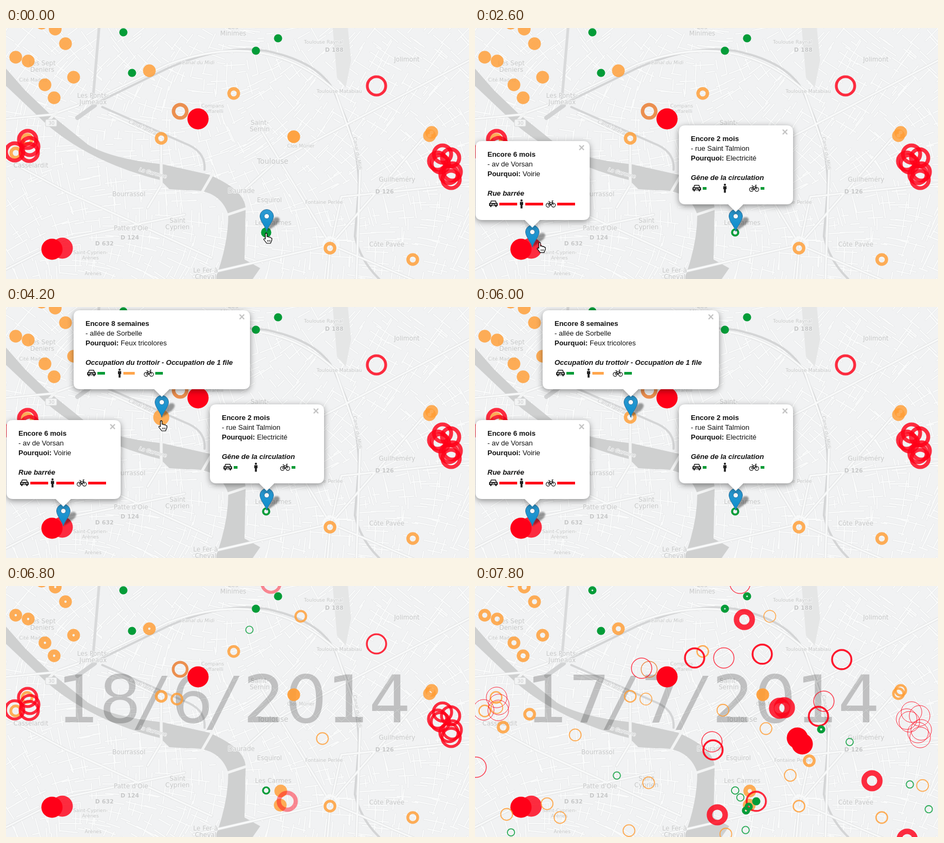
An HTML page that plays this animation: 856 by 464 pixels, repeating every 8000 ms.

```html
<!DOCTYPE html>
<html lang="fr">
<head>
<meta charset="utf-8">
<title>Carte des chantiers</title>
<style>
html, body { margin: 0; width: 100%; height: 100%; overflow: hidden; background: #f1f2f3; }
svg { display: block; width: 856px; height: 464px; }
.label { font-family: "DejaVu Sans", sans-serif; fill: #c6c7c8; text-anchor: middle;
  stroke: #f4f5f5; stroke-width: 2; paint-order: stroke; stroke-linejoin: round; }
.date { font: 122px "DejaVu Sans", sans-serif; fill: #000; opacity: .2; }
.slash { font-style: italic; }
.popup { font: 13px "Liberation Sans", Arial, sans-serif; fill: #111; }
.bold { font-weight: bold; }
.em { font-weight: bold; font-style: italic; }
.box { fill: #fff; filter: drop-shadow(0 3px 6px rgba(0,0,0,.42)); }
.close { font-weight: bold; font-size: 20px; fill: #c3c3c3; text-anchor: middle; }
.line { fill: none; stroke-linejoin: round; stroke-linecap: round; }
</style>
</head>
<body>
<svg viewBox="0 0 856 464">
  <defs>
    <filter id="soft" x="-50%" y="-50%" width="200%" height="200%"><feGaussianBlur stdDeviation="1.6"/></filter>
    <linearGradient id="blue" x2="0" y2="1"><stop stop-color="#2e9bd3"/><stop offset="1" stop-color="#0a8ccb"/></linearGradient>
    <g id="pin">
      <path d="M0 0L7-17Q13-28 21-26Q28-22 18-12Z" fill="#000" opacity=".38" filter="url(#soft)"/>
      <path d="M0 0C-2-9-12-18-12.5-28A12.5 12.5 0 0 1 12.5-28C12-18 2-9 0 0Z" fill="url(#blue)" stroke="#2b6f9c"/>
      <circle cy="-28" r="4.6" fill="#fff" stroke="#2b76a6"/>
    </g>
    <g id="car">
      <path d="M-8-1L-6-2-4.500-6H4.500L6-2 8-1V4H6V6H3.500V4H-3.500V6H-6V4H-8Z" fill="#222"/>
      <path d="M-3.500-4.500H3.500L4.500-1.500H-4.500Z" fill="#fff"/>
      <path d="M-6 1H-3M3 1H6M-2 2H2" stroke="#fff" stroke-width="1.300"/>
    </g>
    <g id="person" fill="#222">
      <circle cy="-6.200" r="2"/>
      <path d="M-3-3.500H3V2H1.800V8.500H-1.800V2H-3Z"/>
    </g>
    <g id="bike" fill="none" stroke="#222" stroke-width="1.200">
      <circle cx="-5" cy="2.500" r="3.600"/><circle cx="5" cy="2.500" r="3.600"/>
      <path d="M-5 2.500L-2-2.500H3.500L0 2.500H-5M0 2.500L-2.500-4.500H-4.500M5 2.500L2.500-5.500H5"/>
    </g>
    <g id="point" fill="#fff" stroke="#000" stroke-width="1.200" stroke-linejoin="round">
      <path d="M-1.500 0Q0-1.500 1.500 0V6L4 5.500 5 7 7.500 6.500 8.500 8 10.500 8.500V12L8 18H1L-4.500 11Q-4.500 8.500-1.500 10Z"/>
      <path d="M2.500 12V15M4.800 12V15M7 12V15" stroke-width=".9"/>
    </g>
    <g id="palm" fill="#fff" stroke="#000" stroke-width="1.200" stroke-linejoin="round">
      <path d="M-4.500 16L-8 9.500Q-7 7.500-4.500 9.500L-6 3Q-4 1-3 3L-2 7-2 1Q0-1 1 1V7L2.500 1.500Q4.500 1 4.500 3L4 8 6 4.500Q8 4.500 7.500 7L5 13V16Z"/>
    </g>
  </defs>
  <g id="map"></g>
  <g id="date"></g>
  <g id="dots"></g>
  <g id="pins"></g>
  <g id="popups"></g>
  <use id="cursor"/>
</svg>
<script>
const STEP = 200, STEPS = 40, REPLAY = 32, MID = 34, END = 39;
const RED = '#ff0018', ORANGE = '#ff9c33', RUST = '#e9792b', GREEN = '#049c38';
const RADIUS = { [RED]: 19.6, [ORANGE]: 11.8, [RUST]: 15.5, [GREEN]: 7.6 };
const $ = id => document.getElementById(id);
const lerp = (a, b, u) => a + (b - a) * u;
const random = seed => () => (seed = (seed * 16807) % 2147483647) / 2147483647;
const pairs = text => text.trim().split(/\s+/).map(p => p.split(',').map(Number));

// ---- base map
const line = (d, color, width) =>
  `<path class="line" d="${d}" stroke="${color}" stroke-width="${width}"/>`;
const area = (d, color) => `<path d="${d}" fill="${color}"/>`;

// short streets that follow a slowly turning grid
function streets() {
  const rnd = random(31);
  let d = '';
  for (let y = -5; y < 475; y += 18) {
    for (let x = -5; x < 865; x += 20) {
      const turn = .5 * Math.sin(x / 140) + .6 * Math.cos(y / 110 + x / 300);
      const a = turn + (rnd() < .5 ? Math.PI / 2 : 0), len = 10 + rnd() * 36;
      const from = [x + rnd() * 20, y + rnd() * 18];
      const by = [Math.cos(a) * len, Math.sin(a) * len];
      d += `M${from.map(v => v.toFixed(1))}l${by.map(v => v.toFixed(1))}`;
    }
  }
  return d;
}

// avenues that leave a centre at even angles
function avenues(x, y, inner, outer, count, tilt) {
  let d = '';
  for (let i = 0; i < count; i++) {
    const a = tilt + i * 2 * Math.PI / count, c = Math.cos(a), s = Math.sin(a);
    d += `M${x + c * inner} ${y + s * inner}L${x + c * outer} ${y + s * outer}`;
  }
  return d;
}

const RIVER = 'M0 75L36 116 80 158 152 216Q195 242 290 252L375 271Q443 300 443 335L441 428 470 444 456 464H387Q411 400 411 345 395 297 335 300L302 298 285 281Q160 250 76 179L0 107Z';
const CANAL = 'M178 146L330 213Q370 228 367 262M160 142L300 74Q400 30 480 42 590 65 612 130 655 220 652 300L645 385Q655 430 690 464';
const ROADS = 'M0 168L85 160 160 134 300 67Q480 0 608 115L655 250 648 464M0 243L110 302 380 425M190 160L287 205V290L262 332M0 446L110 390 330 345M600 406L620 312 856 288M440 300L500 246 856 60' +
  avenues(600, 401, 14, 260, 5, .4);
const BRIDGES = 'M383 268L362 304M443 334L410 345M287 250V290M72 178L94 155';

// text (lines split by |), middle, baseline of the first line
const towns = [
  ['Les|Minimes', 420, 2], ['Les Sept|Deniers', 67, 69], ['Les Ponts-|Jumeaux', 161, 129],
  ['Casselardit', 46, 258], ['Bourrassol', 227, 311], ["Patte d'Oie", 231, 374], ['Saint|Cyprien', 317, 360],
  ['Le Fer à|Cheval', 369, 452], ['Daurade', 435, 305], ['Esquirol', 487, 322], ['Saint-|Sernin', 469, 179],
  ['Les Carmes', 494, 364], ['Jolimont', 741, 62], ['Guilheméry', 723, 284], ['Côte Pavée', 704, 404]
];
const stops = [
  ['Cité Madrid', 50, 99], ['Saint-Cyprien-|Arènes', 156, 418], ['Arènes', 161, 457], ['Clos Mûrier', 545, 221],
  ['Fontaine Perlée', 588, 325], ['Compans|Caffarelli', 382, 147], ['Toulouse Raynal', 587, 29],
  ['Toulouse Matabiau', 616, 120], ['30', 84, 179]
];
const routes = [['D 188', 607, 44], ['D 126', 700, 306], ['D 124', 229, 391], ['D 632', 182, 402]];
const waters = [['La Garonne', 271, 271, 15], ['Canal latéral', 252, 187, 25],
  ['Canal du Midi', 355, 67, 0], ['Canal du Midi', 647, 232, 80]];

const label = (size, extra = '') => ([text, x, y, turn = 0]) => text.split('|').map((part, i) =>
  `<text class="label" font-size="${size}" ${extra} transform="translate(${x} ${y + i * (size + .6)}) rotate(${turn})">${part}</text>`).join('');

function drawMap() {
  const small = streets();
  $('map').innerHTML = [
    area('M0 0H856V464H0Z', '#f1f2f3'),
    line(small, '#e7e8e9', 3.6), line(small, '#fafbfb', 2.2),
    area('M604 0H632L638 60 628 110 612 92Z', '#e5e6e6'),
    area(RIVER, '#cfd0d0'), line(CANAL, '#d4d5d6', 4), line('M132 166L164 143', '#d2d3d4', 8),
    line('M172 0L160 140', '#d9dadb', 5),
    line(ROADS, '#dedfe0', 5.2), line(ROADS, '#f8f9f9', 3.6), line(BRIDGES, '#f3f4f4', 5),
    '<circle cx="600" cy="401" r="13" fill="none" stroke="#f8f9f9" stroke-width="4"/>',
    '<rect x="73" y="169" width="21" height="13" rx="2" fill="#f3f4f4" stroke="#d5d6d7"/>',
    ...towns.map(label(11.6)), label(13.4)(['Toulouse', 493, 251]), ...stops.map(label(9)),
    ...waters.map(label(9, 'font-style="italic"')), ...routes.map(label(10.5, 'font-weight="bold"'))
  ].join('');
}

// ---- works: each ring has a final stroke and gets thinner as its days run out
const works = [];
function add(color, end, points, start = () => 0, alpha = .82) {
  points.forEach(([x, y], i) => works.push({ x, y, color, end, alpha, start: start(i) }));
}
const early = () => MID - 1, fading = () => MID;
const late = i => MID + 1 + i % 3;
function scatter(count, seed) {
  const rnd = random(seed);
  return Array.from({ length: count }, () => [rnd() * 800 + 40, rnd() * 270 + 190]);
}

add(ORANGE, 7, pairs('66,-9 91,2 110,29 18,54 41,61 125,91 72,105 89,129 265,79'));
add(ORANGE, 2.5, pairs('421,121 287,204 599,407 752,428 18,231 39,206'));
add(ORANGE, 4.5, pairs('787,193 783,199'));
add(ORANGE, 12, pairs('532,201'), undefined, .92);
add(RUST, 1.5, pairs('322,154'));
add(RED, -1, pairs('685,107'));
add(RED, 20, pairs('104,407'));
add(RED, 20, pairs('355,168 85,409'), undefined, 1);
add(RED, 1, pairs('40,206 16,229 44,219 43,230 807,233 822,240 798,246 803,251 825,266 819,271 823,280'));
add(GREEN, 6, pairs('217,8 503,19 462,42'), undefined, 1);
add(GREEN, 8, pairs('233,83'), undefined, 1);
add(GREEN, 1.5, pairs('481,378'), undefined, 1);

add(ORANGE, 1.5, pairs('545,56 316,209'), early);
add(ORANGE, -.7, pairs('585,282'), early);
add(ORANGE, 8, pairs('508,379 507,405'), early);
add(GREEN, 0, pairs('450,81'), early);
add(RED, 1.3, pairs('490,-5'), fading);
add(RED, 3.5, pairs('520,398'), fading);

add(RED, 1.5, pairs('460,133 308,152 645,213 438,288 2,335'), late, .75);
add(RED, 3.5, pairs('531,126 406,133 678,136 635,241 440,303'), late, .9);
add(RED, 10, pairs('498,62 563,226 572,225 448,423 734,360 799,468'), late);
add(RED, 20, pairs('596,281 605,292'), late, 1);
add(ORANGE, 5.5, pairs('101,237 52,261 618,323'), late);
add(ORANGE, 1.8, scatter(12, 77), late);
add(GREEN, 5.5, pairs('640,265 501,415 506,408'), late, 1);
add(GREEN, 8, pairs('520,398'), late, 1);
add(GREEN, 1.8, scatter(7, 4242), late);

const hovers = [
  { x: 481, y: 378, from: 0, to: 2 },
  { x: 104, y: 407, from: 7, to: 11 },
  { x: 287, y: 204, from: 18, to: 22 }
];
const hoverAt = k => hovers.find(h => k >= h.from && k <= h.to);

function ring({ x, y, color, end, alpha, start }, k, hot) {
  if (k < start) return '';
  const over = hot && hot.x === x && hot.y === y;
  const r = RADIUS[color] * (over ? 1.25 : 1);
  const w = end + r * .045 * (END - Math.max(k, REPLAY));
  if (w <= 0) return '';
  const at = `<circle cx="${x}" cy="${y}" opacity="${k === start && start ? alpha * .55 : alpha}"`;
  return over || w > r * .88 ? `${at} r="${r}" fill="${color}"/>`
    : `${at} r="${r - w / 2}" fill="none" stroke="${color}" stroke-width="${w}"/>`;
}

function drawDots(k) {
  const hot = hoverAt(k);
  $('dots').innerHTML = works.map(work => ring(work, k, hot)).join('');
}

function drawDate(k) {
  if (k < REPLAY) { $('date').innerHTML = ''; return; }
  const day = new Date(2014, 5, 6 + Math.round((k - REPLAY) * 5.86));
  const d = String(day.getDate()), digit = 77.6, bar = 55.4;
  let x = 94.6 + (2 - d.length) * digit / 2;
  const parts = [d, '/', String(day.getMonth() + 1), '/', '2014'].map(s => {
    const slash = s === '/';
    const span = slash ? `<tspan class="slash" x="${x - 3}" y="255">/</tspan>` : `<tspan x="${x}" y="251.5">${s}</tspan>`;
    x += slash ? bar : s.length * digit;
    return span;
  });
  $('date').innerHTML = `<text class="date">${parts.join('')}</text>`;
}

// ---- popups; bars are the widths beside car, person and bike
const popups = [
  { x: 377, y: 180, w: 211, tip: 482, foot: 376, pin: 0, open: 1, time: '2 mois', road: 'rue Saint Talmion', why: 'Electricité',
    what: 'Gêne de la circulation', bars: [[7, GREEN], [0, GREEN], [7, GREEN]] },
  { x: 1, y: 209, w: 211, tip: 106, foot: 405, pin: 9, open: 9, time: '6 mois', road: 'av de Vorsan', why: 'Voirie',
    what: 'Rue barrée', bars: [[33, RED], [33, RED], [33, RED]] },
  { x: 125, y: 6, w: 326, tip: 288, foot: 204, pin: 19, open: 19, time: '8 semaines', road: 'allée de Sorbelle', why: 'Feux tricolores',
    what: 'Occupation du trottoir - Occupation de 1 file', bars: [[14, GREEN], [21, '#ffa64d'], [14, GREEN]] }
];
const icons = [['car', 33, 44], ['person', 85, 92], ['bike', 139, 151]];

function popupMarkup(p) {
  const t = p.tip - p.x;
  return `<g class="popup" transform="translate(${p.x} ${p.y})">
    <path class="box" d="M12 0H${p.w - 12}q12 0 12 12V134q0 12-12 12H${t + 14}L${t} 160 ${t - 14} 146H12q-12 0-12-12V12Q0 0 12 0Z"/>
    <text class="close" x="${p.w - 15}" y="19">×</text>
    <text class="bold" x="22" y="29">Encore ${p.time}</text>
    <text x="22" y="47">- ${p.road}</text>
    <text x="22" y="65"><tspan class="bold">Pourquoi:</tspan> ${p.why}</text>
    <text class="em" x="22" y="101">${p.what}</text>` +
    icons.map(([name, x, bx], i) => `<use href="#${name}" x="${x}" y="116"/>
      <rect x="${bx}" y="114" width="${p.bars[i][0]}" height="5" fill="${p.bars[i][1]}"/>`).join('') + '</g>';
}

function drawPopups(k) {
  popups.forEach((p, i) => {
    const live = k < REPLAY;
    $('pins').children[i].style.opacity = live && k >= p.pin ? 1 : 0;
    $('popups').children[i].style.opacity = !live || k < p.open ? 0 : k === p.open ? .6 : 1;
  });
}

// ---- cursor: step, x, y
const track = [[0, 481, 380], [1, 481, 380], [6, 135, 388], [7, 112, 400], [14, 120, 397],
  [18, 287, 211], [22, 287, 211], [26, 640, 250], [30, 672, -25]];

function drawCursor(k) {
  const i = track.findIndex(p => p[0] > k), cur = $('cursor');
  cur.style.display = i < 0 ? 'none' : '';
  if (i < 0) return;
  const [k0, x0, y0] = track[i - 1], [k1, x1, y1] = track[i], u = (k - k0) / (k1 - k0);
  const e = u * u * (3 - 2 * u);
  cur.setAttribute('href', hoverAt(k) || (k > 11 && k < 15) ? '#point' : '#palm');
  cur.setAttribute('transform', `translate(${lerp(x0, x1, e)} ${lerp(y0, y1, e)})`);
}

drawMap();
$('pins').innerHTML = popups.map(p => `<use href="#pin" x="${p.tip}" y="${p.foot}"/>`).join('');
$('popups').innerHTML = popups.map(popupMarkup).join('');

let shown = -1;
const begin = performance.now();
function tick() {
  const k = Math.floor((performance.now() - begin) / STEP) % STEPS;
  if (k !== shown) {
    shown = k;
    drawDots(k);
    drawDate(k);
    drawPopups(k);
    drawCursor(k);
  }
  requestAnimationFrame(tick);
}
tick();
</script>
</body>
</html>
```
